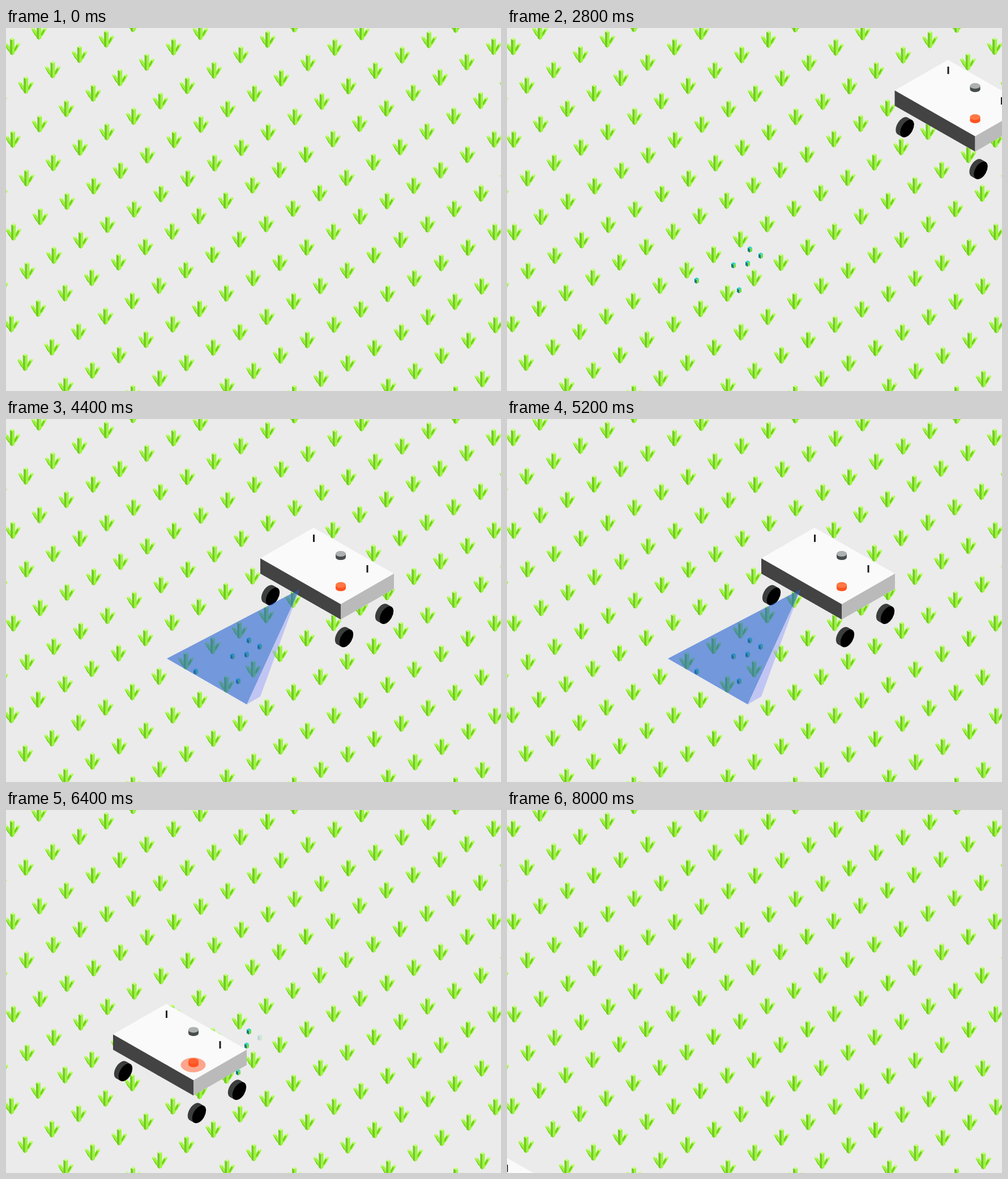
Recreate the animation shown at these times as an HTML page with a canvas. Size 874 px wide and 641 px high, loop 8.4 s.

```html
<!DOCTYPE html>
<html lang="en">
<head>
<meta charset="utf-8">
<title>Field robot</title>
<style>
  html, body { margin: 0; width: 100%; height: 100%; overflow: hidden; background: #ebebeb; }
  canvas { display: block; }
</style>
</head>
<body>
<canvas id="stage" width="874" height="641"></canvas>
<script>
const W = 874, H = 641, STEP = 400, STEPS = 21;
const ctx = document.getElementById('stage').getContext('2d');

// The crop is a lattice: plants along a diagonal, diagonals stacked downwards.
const ORIGIN = { x: 11, y: 32 };
const ALONG = { x: 47.3, y: -27.2 };
const ACROSS = { x: 24.2, y: 68.3 };
const SEAM = { row: 6, x: -4.6, y: -2 };

const WEEDS = [[429, 391], [448, 402], [425, 416], [400, 419], [335, 446], [410, 463]];
const ARRIVE = 5, PARK = 9.5, LEAVE = 13.5, SPRAY = 16;

// Left corner of the robot at key steps.
const PATH = [[ARRIVE, 873], [PARK, 449], [LEAVE, 449], [15, 307], [SPRAY, 189], [20, -189]];

function robotX(step) {
  const i = PATH.findIndex(([s]) => s >= step) || 1;
  const [s0, x0] = PATH[i - 1], [s1, x1] = PATH[i];
  return x0 + (x1 - x0) * (step - s0) / (s1 - s0);
}

function poly(g, color, ...pts) {
  g.fillStyle = color;
  g.beginPath();
  for (let i = 0; i < pts.length; i += 2) g.lineTo(pts[i], pts[i + 1]);
  g.closePath();
  g.fill();
}

function oval(color, x, y, rx, ry) {
  ctx.fillStyle = color;
  ctx.beginPath();
  ctx.ellipse(x, y, rx, ry, 0, 0, 7);
  ctx.fill();
}

// Upright box with its top, left and right faces.
function box(g, x, y, half, height, top, left, right) {
  const d = half * 0.57, up = y - height / 2 + d, down = y + height / 2 - d;
  poly(g, left, x - half, up, x, up + d, x, down + d, x - half, down);
  poly(g, right, x, up + d, x + half, up, x + half, down, x, down + d);
  poly(g, top, x - half, up, x, up - d, x + half, up, x, up + d);
}

function plant(g, x, y) {
  const light = '#9cf53d', dark = '#72cb22', pale = '#c4ff79';
  g.save();
  g.translate(x, y);
  poly(g, light, -14, -4, -8, -4, -3, 4, 0, 16, -8, 7);
  poly(g, dark, -14, -4, -8, 4, 0, 16, -8, 7);
  poly(g, light, 3, 4, 8, -4, 14, -4, 8, 7, 0, 16);
  poly(g, dark, 4, 5, 8, -2, 10, 0, 6, 7, 3, 10);
  poly(g, pale, -14, -4, -11, -6, -7, -4, -10, -2);
  poly(g, pale, 7, -4, 11, -6, 14, -4, 10, -2);
  box(g, 0, 0.5, 4, 31, pale, dark, light);
  g.restore();
}

function makeField() {
  const field = document.createElement('canvas');
  field.width = W;
  field.height = H;
  const g = field.getContext('2d');
  g.fillStyle = '#ebebeb';
  g.fillRect(0, 0, W, H);
  for (let row = 0; row < 14; row++) {
    const shift = row < SEAM.row ? 0 : 1;
    const x = ORIGIN.x + row * ACROSS.x + shift * SEAM.x;
    const y = ORIGIN.y + row * ACROSS.y + shift * SEAM.y;
    for (let i = -5; i < 20; i++) plant(g, x + i * ALONG.x, y + i * ALONG.y);
  }
  return field;
}

function disc(color, x, y, r) {
  ctx.save();
  ctx.transform(0.87, -0.5, 0, 1, x, y);
  ctx.fillStyle = color;
  ctx.beginPath();
  ctx.arc(0, 0, r, 0, 7);
  ctx.fill();
  ctx.restore();
}

function wheel(x, y) {
  for (let k = 8; k > 0; k--) disc('#3c3e3e', x + 4 - k, y + 2.3 - k * 0.57, 14);
  disc('#000', x + 4, y + 2.3, 14);
}

function knob(x, y, top, side) {
  oval(side, x, y + 6, 9, 5);
  ctx.fillStyle = side;
  ctx.fillRect(x - 9, y, 18, 6);
  oval(top, x, y, 9, 5);
}

function rod(x, y) {
  ctx.fillStyle = '#1c1e1e';
  ctx.fillRect(x - 1.5, y - 7, 3, 13);
}

function robot(x, spraying) {
  ctx.save();
  ctx.translate(x, 219 + (496 - x) * 0.577);
  wheel(18, 65);
  wheel(148, 139);
  wheel(219, 98);
  poly(ctx, '#fafafa', 0, 0, 94, -54, 236, 27, 142, 81);
  poly(ctx, '#434343', 0, 0, 142, 81, 142, 108, 0, 27);
  poly(ctx, '#bababa', 142, 81, 236, 27, 236, 54, 142, 108);
  rod(94.5, -35);
  knob(142, -8, '#adb0b0', '#484c4c');
  rod(189, 19);
  if (spraying) oval('rgba(255, 84, 34, .5)', 141.5, 54, 22, 13);
  knob(142, 47, spraying ? '#ff6030' : '#ff7844', '#ff5420');
  ctx.restore();
}

function beam(scale) {
  ctx.save();
  ctx.translate(518, 301);
  ctx.scale(scale, scale);
  poly(ctx, 'rgba(150, 160, 252, .5)', 0, 0, -93, 203, -69, 189);
  poly(ctx, 'rgba(35, 98, 211, .6)', 0, 0, -234, 122, -93, 203);
  ctx.restore();
}

const field = makeField();

function draw(step) {
  ctx.drawImage(field, 0, 0);
  if (step < ARRIVE) return;
  if (step <= SPRAY) {
    WEEDS.forEach(([x, y], i) => {
      ctx.globalAlpha = step === SPRAY && i === 1 ? 0.2 : 1;
      box(ctx, x, y, 4, 11, '#27d8c4', '#117a83', '#74dc44');
    });
    ctx.globalAlpha = 1;
  }
  robot(robotX(step), step === SPRAY);
  if (step > PARK && step < LEAVE) beam(Math.min(1, (step - PARK) * 1.5));
}

const start = performance.now();
function tick() {
  draw(Math.floor((performance.now() - start) / STEP) % STEPS);
  requestAnimationFrame(tick);
}
tick();
</script>
</body>
</html>
```
